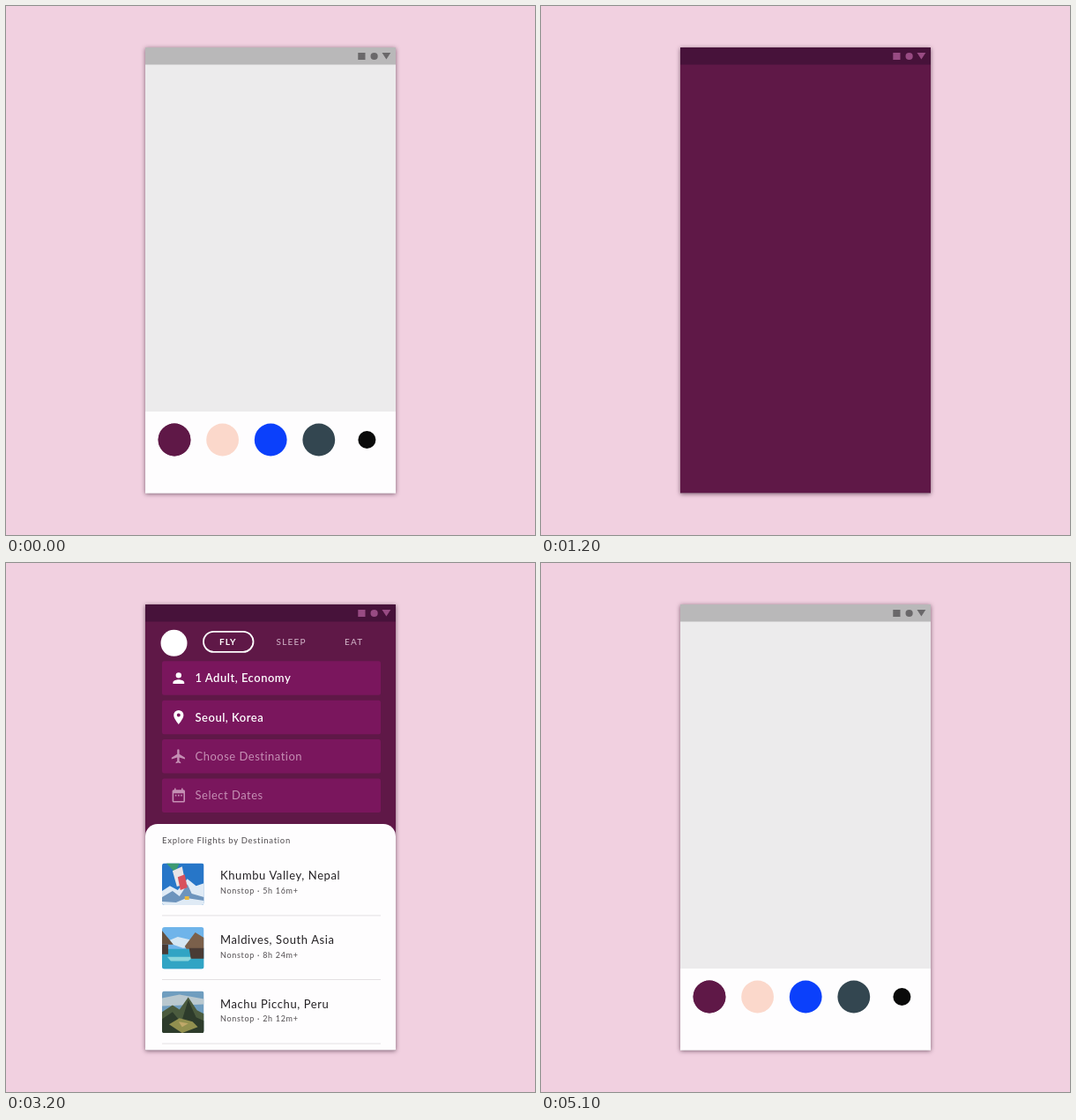
Recreate the animation shown at these times as an HTML page. Size 600 by 600 pixels, loop 5200 ms.

```html
<!DOCTYPE html>
<html lang="en">
<head>
<meta charset="utf-8">
<title>App launch</title>
<style>
  html, body { margin: 0; width: 100%; height: 100%; overflow: hidden; background: #f1d0e0; }
  svg { display: block; }
  #stage { width: 100vw; height: 100vh; }
  text { font-family: Lato, "Open Sans", sans-serif; }
  .shadow { filter: drop-shadow(0 1px 2.5px rgba(60, 30, 50, .65)); }
  .field { font-size: 13px; letter-spacing: .5px; }
  .tab { font-size: 10px; letter-spacing: 1.2px; fill: #d5b9cc; }
  .active { font-weight: 700; fill: #fff; letter-spacing: 1px; }
  .title { font-size: 9.5px; letter-spacing: .7px; font-weight: 500; fill: #5c585b; }
  .place { font-size: 13px; letter-spacing: .6px; fill: #242124; }
  .note { font-size: 9px; letter-spacing: .7px; font-weight: 500; fill: #5f5b5e; }
</style>
</head>
<body>
<svg id="stage" viewBox="0 0 600 600">
  <defs>
    <clipPath id="cardClip"><rect id="cardShape"/></clipPath>
    <g id="system">
      <path d="M399.3 53h8.2v8h-8.2zM426.5 53h9.8l-4.9 7.6z"/>
      <circle cx="417.6" cy="57" r="4.1"/>
    </g>
  </defs>
  <rect width="600" height="600" fill="#f1d0e0"/>
  <rect class="shadow" x="158" y="47" width="284" height="505.5" fill="#ecebec"/>
  <rect x="158" y="47" width="284" height="19.5" fill="#b9b8b9"/>
  <use href="#system" fill="#6a686a"/>
  <rect x="158" y="460" width="284" height="92.5" fill="#fefdfe"/>
  <g id="dock"></g>
  <rect id="scrim" x="158" y="47" width="284" height="505.5"/>
  <g clip-path="url(#cardClip)">
    <rect x="158" y="47" width="284" height="506" fill="#5f1847"/>
    <circle id="splash" cx="300" cy="279" fill="#fff"/>
    <g id="content">
      <g id="header">
        <circle cx="190.5" cy="90.5" r="15" fill="#fff"/>
        <rect x="224" y="77.5" width="56.5" height="23" rx="11.5" fill="none" stroke="#fff" stroke-width="1.8"/>
        <text class="tab active" x="242" y="92.8">FLY</text>
        <text class="tab" x="306.5" y="92.8">SLEEP</text>
        <text class="tab" x="384" y="92.8">EAT</text>
      </g>
      <g id="fields"></g>
      <g id="sheet">
        <rect x="158" y="295" width="284" height="300" rx="14" fill="#fefdfe"/>
        <text class="title" x="177" y="317.3">Explore Flights by Destination</text>
        <g id="rows"></g>
      </g>
    </g>
    <rect x="158" y="47" width="284" height="19.5" fill="#47123a"/>
    <use href="#system" fill="#984b83"/>
  </g>
</svg>
<script>
const LOOP = 5200;
const byId = id => document.getElementById(id);
const clamp = v => Math.min(1, Math.max(0, v));
const mix = (a, b, p) => a + (b - a) * p;
const span = (t, start, length) => clamp((t - start) / length);
const shiftY = (el, y) => el.setAttribute('transform', `translate(0 ${y})`);
const setAll = (el, attrs) => {
  for (const name in attrs) el.setAttribute(name, attrs[name]);
};

// cubic-bezier(.4, 0, .2, 1), solved by bisection
function ease(x) {
  let lo = 0, hi = 1;
  for (let i = 0; i < 22; i++) {
    const s = (lo + hi) / 2, r = 1 - s;
    if (1.2 * r * r * s + .6 * r * s * s + s ** 3 < x) lo = s; else hi = s;
  }
  return 3 * (1 - lo) * lo * lo + lo ** 3;
}

const dockColors = ['#5a1745', '#fbd8cb', '#0b40fb', '#334650', '#0a0a0a'];
byId('dock').innerHTML = dockColors.map((color, i) =>
  `<circle cx="${191 + i * 54.6}" cy="492" r="${i < 4 ? 18.4 : 10}" fill="${color}"/>`).join('');

const fieldData = [
  ['1 Adult, Economy', 'M12 12a4 4 0 1 0 0-8 4 4 0 0 0 0 8zm0 2c-2.7 0-8 1.3-8 4v2h16v-2c0-2.7-5.3-4-8-4z'],
  ['Seoul, Korea', 'M12 2a7 7 0 0 0-7 7c0 5.2 7 13 7 13s7-7.8 7-13a7 7 0 0 0-7-7zm0 9.5a2.5 2.5 0 0 1 0-5 2.5 2.5 0 0 1 0 5z'],
  ['Choose Destination', 'M21 16v-2l-8-5V3.5a1.5 1.5 0 0 0-3 0V9l-8 5v2l8-2.5V19l-2 1.5V22l3.5-1 3.5 1v-1.5L13 19v-5.5z'],
  ['Select Dates', 'M7 11h2v2H7zm4 0h2v2h-2zm4 0h2v2h-2zM19 4h-1V2h-2v2H8V2H6v2H5a2 2 0 0 0-2 2v14a2 2 0 0 0 2 2h14a2 2 0 0 0 2-2V6a2 2 0 0 0-2-2zm0 16H5V9h14z']
];
byId('fields').innerHTML = fieldData.map(([label, icon], i) => {
  const y = 111 + i * 44.3, filled = i < 2;
  return `<g><rect x="177" y="${y}" width="248" height="38.5" rx="2.5" fill="#7a165d"/>
    <g fill="${filled ? '#fff' : '#c58fb4'}">
      <path transform="translate(186.2 ${y + 9.6}) scale(.8)" fill-rule="evenodd" d="${icon}"/>
      <text class="field" x="214.5" y="${y + 24}" font-weight="${filled ? 600 : 400}">${label}</text>
    </g></g>`;
}).join('');

const shape = (fill, d) => `<path fill="${fill}" d="${d}"/>`;
const mountains =
  shape('#2776c8', 'M0 0h48v48H0z') +
  shape('#dfeaf5', 'M0 32l9-6 9 5 11-13 10 8 9-3v25H0z') +
  shape('#6d94bd', 'M0 39l12-7 8 6 9-14 5 11 14 4v4l-20-3-12 5-16-1z') +
  shape('#3c9a72', 'M5 0h15l-5 11z') +
  shape('#e8e4e6', 'M12 9l11-5 4 20-10 3z') +
  shape('#d9515c', 'M18 16l8-3 3 15-8 3z') +
  shape('#e9b83e', 'M26 38h5v4h-5z');
const lagoon =
  shape('#6fb4ea', 'M0 0h48v48H0z') +
  shape('#d5e7f3', 'M4 17l14-6 16 4 8 6-18 3z') +
  shape('#31a4c4', 'M0 25h48v23H0z') +
  shape('#8bd6dc', 'M6 34h30l-6 5H10z') +
  shape('#66513f', 'M0 4l13 16H0z') +
  shape('#7b604b', 'M26 22L38 6l10 6v13H28z') +
  shape('#493b35', 'M31 24h17v12H33zM0 20h7v11H0z');
const ruins =
  shape('#6f9dbf', 'M0 0h48v48H0z') +
  shape('#b9c8cf', 'M0 8l20-4 28 5v6L0 17z') +
  shape('#4b5b3e', 'M0 24l12-8 8 5 10-14 10 15 8 4v22H0z') +
  shape('#2d3b2b', 'M0 32l12-8 10 12 8-26 9 20 9 4v14H0z') +
  shape('#92904f', 'M8 38l12-7 15 4 6 6-18 7z') +
  shape('#c0a869', 'M19 35l11 2-7 4z');

const rowData = [
  ['Khumbu Valley, Nepal', '5h 16m+', mountains],
  ['Maldives, South Asia', '8h 24m+', lagoon],
  ['Machu Picchu, Peru', '2h 12m+', ruins]
];
byId('rows').innerHTML = rowData.map(([place, time, picture], i) =>
  `<g transform="translate(0 ${i * 72.6})">
    <svg x="177" y="339.5" width="47.5" height="47.5" viewBox="0 0 48 48" style="clip-path: inset(0 round 3px)">${picture}</svg>
    <text class="place" x="243" y="358.5">${place}</text>
    <text class="note" x="243" y="374.2">Nonstop · ${time}</text>
    <path d="M177 399h248" stroke="#e4e0e3"/>
  </g>`).join('');

const fields = [...byId('fields').children];
const fieldTravel = [104, 111, 121, 143];

function draw(t) {
  // The card grows out of the first dock icon and later returns to it.
  const open = t < 4000 ? ease(span(t, 280, 893)) : 1 - ease(span(t, 4325, 640));
  const wide = clamp(open * 1.7);
  const left = mix(172.6, 158, wide), top = mix(473.6, 47, open);
  setAll(byId('cardShape'), {
    x: left, y: top, rx: 18.4 * (1 - wide),
    width: mix(209.4, 442, wide) - left,
    height: mix(510.4, 552.5, open) - top
  });
  byId('scrim').setAttribute('opacity', .3 * clamp(open * 1.5));

  setAll(byId('splash'), {
    r: 47 * ease(span(t, 1200, 550)),
    opacity: 1 - span(t, 2150, 300)
  });

  const away = 1 - ease(span(t, 2400, 870));
  const fade = i => span(t, 2470 + i * 90, 330);
  shiftY(byId('content'), top - 47);
  byId('content').setAttribute('opacity', t < 2400 ? 0 : 1 - span(t, 4450, 220));
  shiftY(byId('header'), 104 * away);
  byId('header').setAttribute('opacity', fade(0));
  fields.forEach((field, i) => {
    shiftY(field, fieldTravel[i] * away);
    field.setAttribute('opacity', fade(i));
  });
  shiftY(byId('sheet'), 258 * away);
}

const begin = performance.now();
function tick() {
  draw((performance.now() - begin) % LOOP);
  requestAnimationFrame(tick);
}
tick();
</script>
</body>
</html>
```
